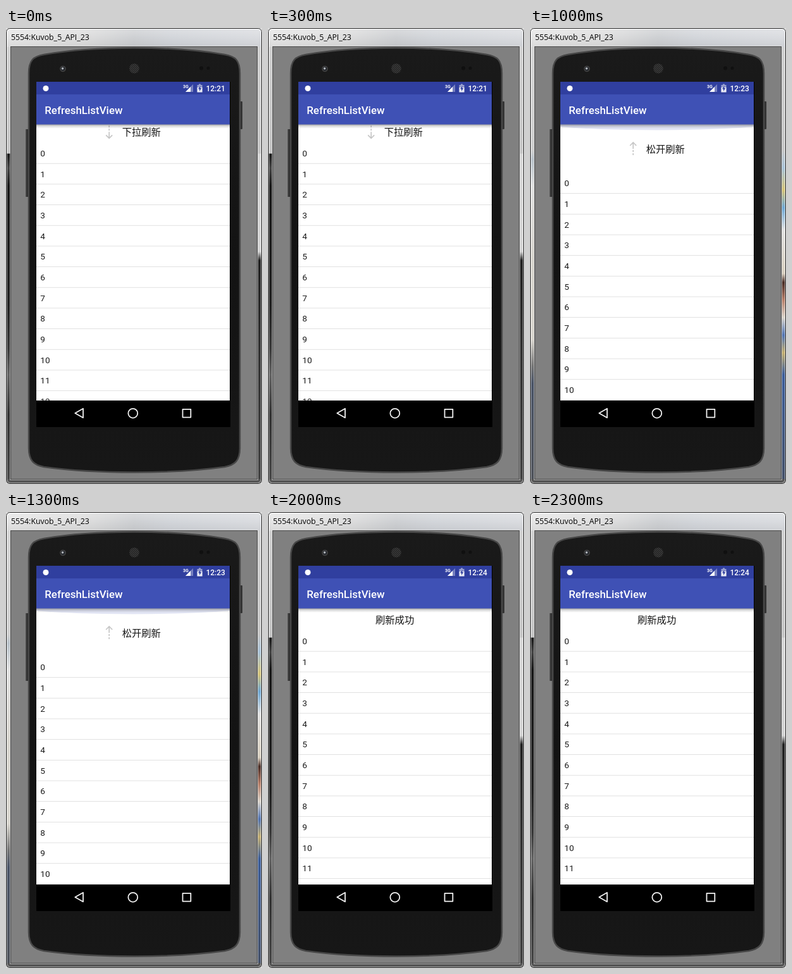
Write an HTML page that moves like this. It is 405x721 px and loops after 2500 ms.

```html
<!DOCTYPE html>
<html lang="zh">
<head>
<meta charset="utf-8">
<style>
  html, body { margin: 0; width: 100%; height: 100%; overflow: hidden; background: #ddd; }
  svg { display: block; width: 405px; height: 721px; }
  text { font-family: Roboto, sans-serif; }
  .caption { font: 12.3px "Open Sans", sans-serif; }
  .medium { font-weight: 500; fill: #fff; }
  .row { font-size: 13.6px; fill: #1c1c1c; }
  .hint { font: 15.3px "Noto Sans CJK SC", "Noto Sans CJK", sans-serif; fill: #151515; }
</style>
</head>
<body>
<svg viewBox="0 0 405 721">
  <defs>
    <linearGradient id="bar">
      <stop offset="0" stop-color="#e4e4e4"/><stop offset=".3" stop-color="#dcdcdc"/>
      <stop offset=".5" stop-color="#cbcdd0"/><stop offset=".65" stop-color="#d0d3d8"/>
      <stop offset="1" stop-color="#d8dade"/>
    </linearGradient>
    <linearGradient id="gloss" x2="0" y2="1">
      <stop offset="0" stop-color="#fff" stop-opacity=".3"/>
      <stop offset=".5" stop-color="#fff" stop-opacity=".05"/>
      <stop offset="1" stop-color="#000" stop-opacity=".04"/>
    </linearGradient>
    <linearGradient id="darkL" x2="0" y2="1">
      <stop offset="0" stop-color="#d2d2d2"/><stop offset=".256" stop-color="#c6c6c6"/>
      <stop offset=".258" stop-color="#181818"/><stop offset=".29" stop-color="#484848"/>
      <stop offset=".33" stop-color="#1a1a1a"/><stop offset=".6" stop-color="#222"/>
      <stop offset=".7" stop-color="#3b3b3b"/><stop offset=".76" stop-color="#666"/>
      <stop offset=".85" stop-color="#333"/><stop offset="1" stop-color="#4a4a4a"/>
    </linearGradient>
    <linearGradient id="darkR" x2="0" y2="1">
      <stop offset="0" stop-color="#d2d2d2"/><stop offset=".256" stop-color="#c6c6c6"/>
      <stop offset=".258" stop-color="#d8d8d8"/><stop offset=".48" stop-color="#d4d4d4"/>
      <stop offset=".5" stop-color="#222"/><stop offset=".7" stop-color="#333"/>
      <stop offset="1" stop-color="#444"/>
    </linearGradient>
    <linearGradient id="lightL" x2="0" y2="1">
      <stop offset="0" stop-color="#d6d6d6"/><stop offset=".25" stop-color="#d0d0d0"/>
      <stop offset=".27" stop-color="#b9c3cb"/><stop offset=".33" stop-color="#e2e2e2"/>
      <stop offset=".5" stop-color="#d8d5ce"/><stop offset=".68" stop-color="#d9d6cf"/>
      <stop offset=".74" stop-color="#777"/><stop offset=".78" stop-color="#4b5568"/>
      <stop offset="1" stop-color="#50545c"/>
    </linearGradient>
    <linearGradient id="lightR" x2="0" y2="1">
      <stop offset="0" stop-color="#d2d2d2"/><stop offset=".25" stop-color="#c8c8c8"/>
      <stop offset=".29" stop-color="#a9c4da"/><stop offset=".34" stop-color="#d8c678"/>
      <stop offset=".38" stop-color="#6fa9d6"/><stop offset=".43" stop-color="#e3e3e3"/>
      <stop offset=".53" stop-color="#d9d0c0"/><stop offset=".55" stop-color="#4a2d26"/>
      <stop offset=".59" stop-color="#b9806a"/><stop offset=".63" stop-color="#dcd6cc"/>
      <stop offset=".67" stop-color="#5275b4"/><stop offset=".71" stop-color="#c6b070"/>
      <stop offset=".76" stop-color="#3d5f9c"/><stop offset="1" stop-color="#46526a"/>
    </linearGradient>
    <linearGradient id="shade" x2="0" y2="1">
      <stop offset="0" stop-color="#000" stop-opacity=".4"/>
      <stop offset=".45" stop-color="#000" stop-opacity=".14"/>
      <stop offset="1" stop-color="#000" stop-opacity="0"/>
    </linearGradient>
    <linearGradient id="shell" x2="0" y2="1">
      <stop offset="0" stop-color="#1a1a1a"/><stop offset=".5" stop-color="#131313"/>
      <stop offset="1" stop-color="#171717"/>
    </linearGradient>
    <pattern id="mesh" width="3" height="3" patternUnits="userSpaceOnUse">
      <rect width="3" height="3" fill="#1c1c1c"/>
      <circle cx="1" cy="1" r=".8" fill="#5c5c5c"/><circle cx="2.5" cy="2.5" r=".7" fill="#484848"/>
    </pattern>
    <clipPath id="view"><rect x="48" y="152" width="306" height="437"/></clipPath>
  </defs>

  <g id="window">
    <rect width="405" height="721" rx="7" fill="#222"/>
    <rect id="edgeL" x="1" y="20" width="7" height="695"/>
    <rect id="edgeR" x="397" y="20" width="7" height="695"/>
    <rect x="1" y="713" width="403" height="7" rx="3" fill="#565656"/>
    <path d="M1 30V7Q1 1 7 1H398Q404 1 404 7V30Z" fill="url(#bar)"/>
    <path d="M1 30V7Q1 1 7 1H398Q404 1 404 7V30Z" fill="url(#gloss)"/>
    <rect x="1.5" y="1.5" width="402" height="718" rx="6" fill="none" stroke="#fff" stroke-opacity=".55"/>
    <rect x="6.5" y="28.5" width="392" height="686" fill="none" stroke="#ddd" stroke-opacity=".65"/>
    <rect x="7.5" y="29.5" width="390" height="684" fill="#808080" stroke="#484848"/>
    <text class="caption" x="8" y="19">5554:Kuvob_5_API_23</text>
  </g>

  <g id="phone">
    <rect x="31" y="160" width="5" height="107" rx="1" fill="#303030"/>
    <rect x="31" y="160" width="1.5" height="107" fill="#4a4a4a"/>
    <rect x="370" y="116" width="4" height="44" rx="1" fill="#333"/>
    <path d="M36 72C36 51 43 45 60 42C100 35 150 31.5 203 31.5S306 35 346 42C363 45 370 51 370 72V664C370 684 362 691 346 694C306 699.5 256 702.5 203 702.5S100 699.5 60 694C44 691 36 684 36 664Z"
      fill="url(#shell)" stroke="#474747" stroke-width="2.5"/>
    <circle cx="90" cy="64.5" r="4.8" fill="#444"/>
    <circle cx="90" cy="64.5" r="3.2" fill="#20242a"/>
    <circle cx="89.6" cy="64" r="1.8" fill="#b4b8bd"/>
    <circle cx="203" cy="64" r="7.8" fill="url(#mesh)"/>
    <circle cx="309" cy="63.5" r="3" fill="#101010"/>
    <circle cx="320" cy="63.5" r="2.5" fill="#101010"/>
    <rect x="48" y="85" width="307" height="546"/>
  </g>

  <rect x="48" y="152" width="306" height="437" fill="#fff"/>
  <g clip-path="url(#view)">
    <path id="glow" d="M48 153H354V156Q300 161 201 161.5Q100 161 48 156Z" fill="#3f51b5" fill-opacity=".15"/>
    <g id="list"></g>
    <g id="head">
      <g id="arrow" fill="none" stroke="#c6c6c6" stroke-width="1.7">
        <path d="M-5 5L0 10L5 5M0 10V0M0-2V-5M0-7V-10"/>
      </g>
      <g id="spin" stroke-width="1.5" stroke-linecap="round"></g>
      <text id="hint" class="hint" y="5.6"></text>
    </g>
    <rect x="48" y="152" width="306" height="7" fill="url(#shade)"/>
  </g>

  <rect x="48" y="85" width="306" height="20" fill="#303f9f"/>
  <rect x="48" y="105" width="306" height="47.5" fill="#3f51b5"/>
  <text class="medium" x="61.3" y="135.5" font-size="16.9">RefreshListView</text>

  <g fill="#fff">
    <circle cx="63" cy="95.5" r="4.5"/>
    <text x="280" y="94.5" font-size="7" font-weight="700">3G</text>
    <path d="M284 101L296 89V101Z" fill-opacity=".35"/>
    <path d="M284 101L292 93V101Z"/>
    <path d="M302.5 90H305V88.5H308V90H310.5V101.5H302.5Z" fill-opacity=".5"/>
    <path d="M302.5 94H310.5V101.5H302.5Z" fill-opacity=".8"/>
    <path d="M307.5 91.5L304 96.5H306V100L309.2 95H307.2Z" fill="#303f9f"/>
  </g>
  <text id="clock" class="medium" x="316.5" y="99.8" font-size="11.9"></text>

  <g fill="none" stroke="#f2f2f2" stroke-width="1.8" stroke-linejoin="round">
    <path d="M109.3 609L122 601.8V616.2Z"/>
    <circle cx="200.8" cy="609.2" r="7.4"/>
    <rect x="279.5" y="602.8" width="12.8" height="12.8"/>
  </g>
</svg>
<script>
const $ = id => document.getElementById(id);
const STEP = 500, ROW = 32.67;

// y: baseline of the first row, head: centre of the refresh header
const steps = [
  { y: 203,   head: 164.3, clock: '12:21', hint: '下拉刷新', icon: 'down' },
  { y: 216,   head: 173.8, clock: '12:22', hint: '松开刷新', icon: 'up' },
  { y: 250.4, head: 191,   clock: '12:23', hint: '松开刷新', icon: 'up', over: true },
  { y: 209,   head: 170.4, clock: '12:23', hint: '正在刷新', icon: 'spin' },
  { y: 209,   head: 170.4, clock: '12:24', hint: '刷新成功' }
];

function add(parent, tag, attrs, text = '') {
  const el = document.createElementNS('http://www.w3.org/2000/svg', tag);
  for (const k in attrs) el.setAttribute(k, attrs[k]);
  el.textContent = text;
  parent.append(el);
}

for (let i = 0; i < 13; i++) {
  add($('list'), 'text', { class: 'row', x: 54.3, y: i * ROW }, i);
  add($('list'), 'rect', { x: 48, y: 10.8 + i * ROW, width: 306, height: 0.85, fill: '#dcdcdc' });
}
for (let i = 0; i < 12; i++) {
  add($('spin'), 'path', {
    d: 'M0-4.2V-7.2', stroke: '#777', 'stroke-opacity': 0.2 + 0.5 * ((i + 2) % 12) / 11,
    transform: `translate(163.5) rotate(${i * 30})`
  });
}

const show = (id, on) => $(id).setAttribute('visibility', on ? 'visible' : 'hidden');

function draw(s) {
  $('list').setAttribute('transform', `translate(0 ${s.y})`);
  $('head').setAttribute('transform', `translate(0 ${s.head})`);
  $('arrow').setAttribute('transform', `translate(163.2) scale(1 ${s.icon === 'up' ? -1 : 1})`);
  $('hint').setAttribute('x', s.icon ? 183.7 : 170);
  $('hint').textContent = s.hint;
  $('clock').textContent = s.clock;
  show('arrow', s.icon === 'up' || s.icon === 'down');
  show('spin', s.icon === 'spin');
  show('glow', s.over);
  const tone = s.over ? 'light' : 'dark';
  for (const side of 'LR') $('edge' + side).setAttribute('fill', `url(#${tone}${side})`);
}

const start = performance.now();
let current;
function tick() {
  const s = steps[Math.floor((performance.now() - start) / STEP) % steps.length];
  if (s !== current) draw(current = s);
  requestAnimationFrame(tick);
}
tick();
</script>
</body>
</html>
```
